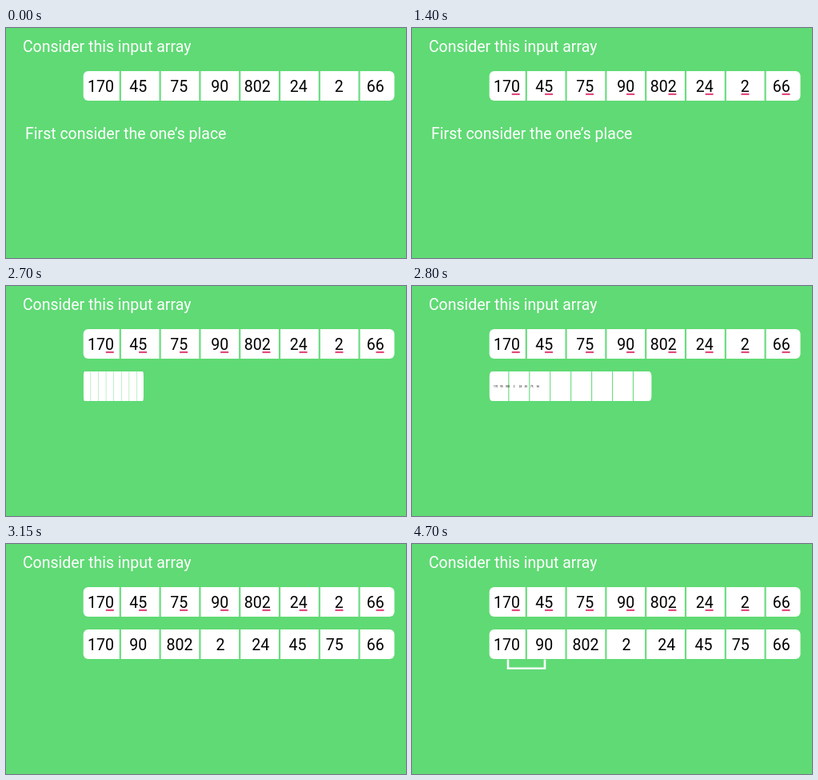
Recreate the animation shown at these times as an HTML page. Size 500 by 288 pixels, loop 5050 ms.

```html
<!DOCTYPE html>
<html lang="en">
<head>
<meta charset="utf-8">
<title>Radix sort</title>
<style>
  html, body { margin: 0; width: 100%; height: 100%; overflow: hidden; background: #60da75; }
  svg { display: block; width: 500px; height: 288px; }
  text { font: 19.5px Roboto, sans-serif; fill: #fff; }
  .numbers { font-size: 19.55px; fill: #000; }
</style>
</head>
<body>
<svg viewBox="0 0 500 288">
  <text x="20.9" y="30">Consider this input array</text>
  <text id="step" x="24" y="139">First consider the one’s place</text>
  <g id="input"></g>
  <g id="marks" fill="#e04c7a"></g>
  <g id="cells"></g>
  <g id="sorted"></g>
  <path id="bracket" d="M120 144.5V155.7H166V144.5" pathLength="1" fill="none" stroke="#fff" stroke-width="2.6"/>
</svg>
<script>
const LOOP = 5050;
const LEFT = 97;
const TEXT_LEFT = 102;
const $ = id => document.getElementById(id);

function add(parent, tag, attrs) {
  const el = document.createElementNS('http://www.w3.org/2000/svg', tag);
  for (const key in attrs) el.setAttribute(key, attrs[key]);
  parent.append(el);
  return el;
}

function drawCells(parent, y) {
  add(parent, 'rect', { x: LEFT - 0.3, y, width: 388.8, height: 37, rx: 6, fill: '#fff' });
  for (let i = 0; i < 7; i++) {
    add(parent, 'rect', { x: 141.7 + i * 49.8, y, width: 2.2, height: 37, fill: '#6bdc80' });
  }
}

// One line of text, with spaces setting the gaps
function drawNumbers(parent, line, y) {
  const el = add(parent, 'text', { class: 'numbers', x: TEXT_LEFT, y });
  el.textContent = line.replaceAll(' ', '\u00a0');
  return el;
}

function underlineOnes(text, parent) {
  for (const { index } of text.textContent.matchAll(/\d\b/g)) {
    const from = text.getStartPositionOfChar(index).x;
    const to = text.getEndPositionOfChar(index).x;
    add(parent, 'rect', { x: (from + to) / 2 - 4.7, y: 81.8, width: 10, height: 2.2 });
  }
}

drawCells($('input'), 54);
const input = drawNumbers($('input'), '170    45      75      90    802     24       2      66', 79.5);
underlineOnes(input, $('marks'));
drawCells($('cells'), 107);
drawNumbers($('sorted'), '170    90     802      2       24     45     75      66', 133);

// Smooth progress from 0 to 1 between two times
function ease(t, from, to) {
  const p = Math.min(1, Math.max(0, (t - from) / (to - from)));
  return p * p * (3 - 2 * p);
}

function show(el, amount) {
  el.style.visibility = amount > 0 ? 'visible' : 'hidden';
}

function render(t) {
  $('marks').setAttribute('opacity', ease(t, 650, 860));
  $('step').setAttribute('opacity', 1 - ease(t, 2200, 2570));

  const width = ease(t, 2580, 3010);
  show($('cells'), width);
  $('cells').setAttribute('transform', `translate(${LEFT * (1 - width)} 0) scale(${width} 1)`);

  const size = ease(t, 2715, 3060);
  show($('sorted'), size);
  $('sorted').setAttribute('transform',
    `translate(${TEXT_LEFT * (1 - size)} ${126 * (1 - size)}) scale(${size})`);

  const drawn = ease(t, 4250, 4700);
  show($('bracket'), drawn);
  $('bracket').setAttribute('stroke-dasharray', drawn < 1 ? `${drawn} 2` : 'none');
}

const start = performance.now();
function tick(now) {
  render(Math.max(0, now - start) % LOOP);
  requestAnimationFrame(tick);
}
render(0);
requestAnimationFrame(tick);
</script>
</body>
</html>
```
